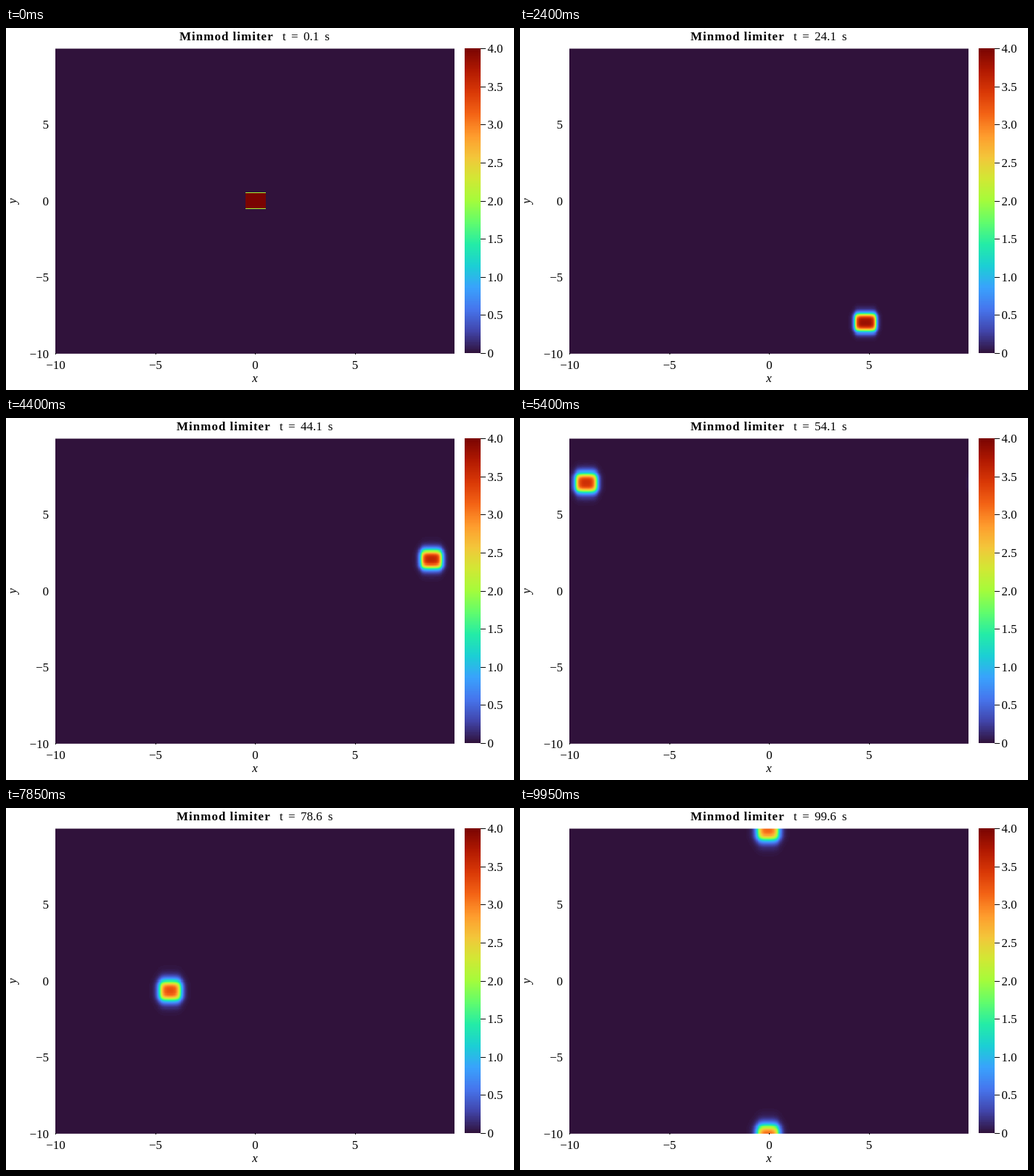
Animation, 700 px wide and 500 px high, one loop 10000 ms. Source, as an HTML page with a canvas:

```html
<!DOCTYPE html>
<html>
<head>
<meta charset="utf-8">
<style>
html, body { margin: 0; width: 100%; height: 100%; overflow: hidden; background: #fff; }
canvas { display: block; }
</style>
</head>
<body>
<canvas id="stage" width="700" height="500"></canvas>
<script>
const ctx = document.getElementById('stage').getContext('2d');
const FRAMES = 200, FRAME_MS = 50, STEPS_PER_FRAME = 10;
const PEAK = 4;
const plot = { x: 68, y: 28, w: 550, h: 422 };
const bar = { x: 632, w: 22, h: 421 };
const SERIF = '"Liberation Serif", serif';

const turbo = ['30123b', '4145ab', '4675ed', '39a2fc', '1bcfd4', '24eca6', '61fc6c', 'a4fc3b',
  'd1e834', 'f3c63a', 'fe9b2d', 'f36315', 'd93806', 'b11901', '7a0402']
  .map(hex => [0, 2, 4].map(i => parseInt(hex.slice(i, i + 2), 16)));

function sampleTurbo(u) {
  const p = u * (turbo.length - 1);
  const i = Math.min(Math.floor(p), turbo.length - 2);
  return turbo[i].map((c, k) => Math.round(c + (turbo[i + 1][k] - c) * (p - i)));
}
const palette = Array.from({ length: 256 }, (_, i) => sampleTurbo(i / 255));

const minmod = (a, b) => a * b <= 0 ? 0 : Math.abs(a) < Math.abs(b) ? a : b;

// One second-order upwind step with limited slopes on a periodic grid.
function advect(q, courant) {
  const n = q.length;
  const flux = q.map((v, i) =>
    v + 0.5 * (1 - courant) * minmod(v - q[(i + n - 1) % n], q[(i + 1) % n] - v));
  return q.map((v, i) => v - courant * (flux[i] - flux[(i + n - 1) % n]));
}

// The square pulse stays a product of two profiles, so each axis is solved alone.
function solve({ cells, start, width, courant }) {
  let q = advect(new Float64Array(cells).fill(1, start, start + width), courant);
  const history = [];
  for (let f = 0; f < FRAMES; f++) {
    history.push(q);
    for (let s = 0; s < STEPS_PER_FRAME; s++) q = advect(q, courant);
  }
  return history;
}
const profileX = solve({ cells: 799, start: 380, width: 41, courant: 0.4 });
const profileY = solve({ cells: 399, start: 189, width: 21, courant: 0.5 });

function text(str, x, y, align = 'left', font = `17px ${SERIF}`) {
  ctx.font = font;
  ctx.textAlign = align;
  ctx.fillText(str, x, y);
}

const image = ctx.createImageData(plot.w, plot.h);
function drawField(frame) {
  const fx = profileX[frame], fy = profileY[frame];
  let p = 0;
  for (let r = 0; r < plot.h; r++) {
    const gy = fy[Math.floor((plot.h - r - 0.5) * fy.length / plot.h)];
    for (let c = 0; c < plot.w; c++) {
      const value = gy * fx[Math.floor((c + 0.5) * fx.length / plot.w)];
      const rgb = palette[Math.round(255 * Math.min(Math.max(value, 0), 1))];
      image.data[p++] = rgb[0];
      image.data[p++] = rgb[1];
      image.data[p++] = rgb[2];
      image.data[p++] = 255;
    }
  }
  ctx.putImageData(image, plot.x, plot.y);
}

function drawAxes() {
  const bottom = plot.y + plot.h;
  ctx.fillStyle = 'rgba(255, 255, 255, 0.5)';
  ctx.fillRect(plot.x, plot.y, plot.w, 1);
  ctx.fillStyle = 'rgba(255, 255, 255, 0.15)';
  ctx.fillRect(plot.x, bottom - 1, plot.w, 1);
  ctx.fillStyle = '#000';
  for (const v of [-10, -5, 0, 5]) {
    const label = String(v).replace('-', '\u2212');
    const x = plot.x + (v + 10) / 20 * plot.w;
    const y = bottom - (v + 10) / 20 * plot.h;
    ctx.fillRect(Math.round(x), bottom - 1, 1, 2);
    text(label, x + 0.5, 471, 'center');
    text(label, 59, y + 5.5, 'right');
  }
  text('x', 343, 489, 'center', `italic 17px ${SERIF}`);
  ctx.save();
  ctx.translate(14, 239);
  ctx.rotate(-Math.PI / 2);
  text('y', 0, 0, 'center', `italic 17px ${SERIF}`);
  ctx.restore();
}

function drawColorbar() {
  for (let r = 0; r < bar.h; r++) {
    ctx.fillStyle = `rgb(${palette[Math.round(255 * (1 - r / (bar.h - 1)))]})`;
    ctx.fillRect(bar.x, plot.y + r, bar.w, 1);
  }
  ctx.fillStyle = '#000';
  for (let v = 0; v <= PEAK; v += 0.5) {
    const y = plot.y + (1 - v / PEAK) * bar.h;
    ctx.fillRect(bar.x + bar.w, Math.round(y), 7, 1);
    text(v ? v.toFixed(1) : '0', 663.5, y + 6);
  }
}

function drawTitle(frame) {
  const seconds = (0.1 + frame * 0.5).toFixed(1);
  const left = seconds.length < 4 ? 239 : 235;
  ctx.letterSpacing = '1px';
  text('Minmod limiter', left, 17, 'left', `bold 17px ${SERIF}`);
  ctx.letterSpacing = '0px';
  text('t', left + 142, 17);
  text('=', left + 154, 17);
  text(seconds, left + 171, 17);
  text('s', left + 179 + ctx.measureText(seconds).width, 17);
}

let shown = -1;
function render(now) {
  const frame = Math.floor(now / FRAME_MS) % FRAMES;
  if (frame === shown) return;
  shown = frame;
  ctx.fillStyle = '#fff';
  ctx.fillRect(0, 0, 700, 500);
  drawField(frame);
  drawAxes();
  drawColorbar();
  drawTitle(frame);
}

const origin = performance.now();
function tick() {
  render(performance.now() - origin);
  requestAnimationFrame(tick);
}
tick();
</script>
</body>
</html>
```
